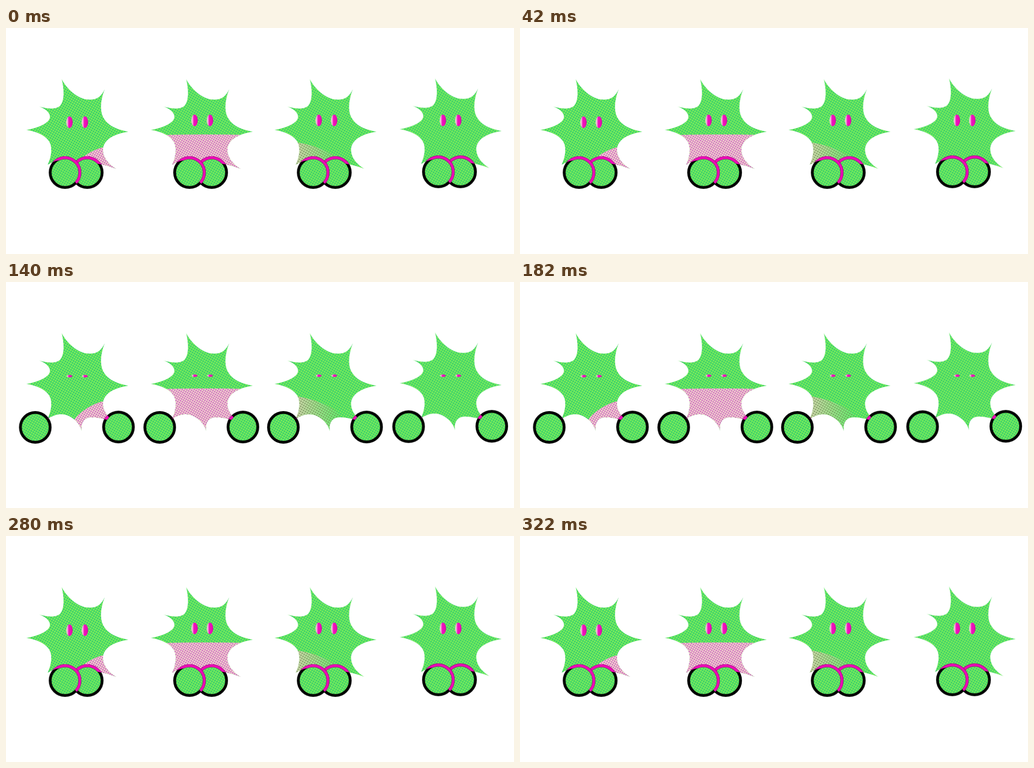
An HTML page that plays this animation: 1121x499 px, repeating every 0.35 s.

```html
<!DOCTYPE html>
<html lang="en">
<head>
<meta charset="utf-8">
<title>Spiky walkers</title>
<style>
  html, body { margin: 0; width: 100%; height: 100%; overflow: hidden; background: #fff; }
  svg { display: block; width: 1121px; height: 499px; }
  .left, .right, .eye { animation: 350ms step-end infinite; }
  .left { animation-name: left; }
  .right { animation-name: right; }
  .eye { animation-name: blink; }
  .ring { fill: none; stroke-width: 6.2; }
  .black { stroke: #000; }
  .pink { stroke: #ec0cb6; }
  @keyframes left {
    0%, 80% { transform: translate(130.3px, 319.2px); }
    20%, 60% { transform: translate(96.8px, 320.7px); }
    40% { transform: translate(64.6px, 321px); }
  }
  @keyframes right {
    0%, 80% { transform: translate(179.3px, 319.2px); }
    20%, 60% { transform: translate(214.8px, 320.7px); }
    40% { transform: translate(248.2px, 320.2px); }
  }
  @keyframes blink {
    0%, 60% { transform: none; }
    40% { transform: translateY(var(--dip)) scale(.9, .22); }
  }
</style>
</head>
<body>
<svg viewBox="0 0 1121 499">
  <defs>
    <path id="body" d="M123 113C133 133 158 158 183 158C200 159 210 152 218 135
      C208 160 207 184 215 198C225 216 244 224 270 229
      C238 234 217 246 214 266C213 284 224 299 243 311
      C222 303 195 296 180 300C169 304 165 315 167 329
      C163 310 142 292 122 292C110 292 100 297 92 302
      C97 290 102 276 99 260C95 240 70 229 45 225
      C70 221 97 210 97 196C97 186 85 177 72 173
      C92 179 110 180 119 172C130 160 128 134 123 113Z"/>
    <clipPath id="inBody"><use href="#body"/></clipPath>
    <clipPath id="inGreen">
      <use href="#body"/>
      <circle cx="179.3" cy="319.2" r="34"/>
    </clipPath>
    <pattern id="green" width="5" height="5" patternUnits="userSpaceOnUse" patternTransform="rotate(30)">
      <rect width="5" height="5" fill="#56ee62"/>
      <circle cx="1.3" cy="1.3" r="1.15" fill="#2c9a78"/>
      <circle cx="3.8" cy="3.8" r="1.1" fill="#b2dc50"/>
    </pattern>
    <pattern id="rose" width="4.6" height="4.6" patternUnits="userSpaceOnUse" patternTransform="rotate(30)">
      <rect width="4.6" height="4.6" fill="#f5dee2"/>
      <circle cx="1.5" cy="1.5" r="1.4" fill="#c23cae"/>
      <circle cx="3.7" cy="3.7" r=".8" fill="#d8b070"/>
    </pattern>
    <pattern id="specks" width="5" height="5" patternUnits="userSpaceOnUse" patternTransform="rotate(30)">
      <circle cx="1.3" cy="1.3" r="1.25" fill="#66804e"/>
    </pattern>
    <linearGradient id="fade">
      <stop offset="0" stop-color="#d6d3b0"/>
      <stop offset=".45" stop-color="#a4df8e"/>
      <stop offset="1" stop-color="#62ee6c"/>
    </linearGradient>
    <linearGradient id="iris">
      <stop offset="0" stop-color="#d4ecc4"/>
      <stop offset=".22" stop-color="#f0a4d8"/>
      <stop offset=".4" stop-color="#f014bc"/>
      <stop offset=".8" stop-color="#ea0cb4"/>
      <stop offset="1" stop-color="#b81c94"/>
    </linearGradient>
  </defs>
  <g id="stage"></g>
</svg>
<script>
  const bellies = {
    corner: 'M149 306C160 289 188 269 216 263L260 340H149Z',
    half: 'M80 236Q168 234 255 236V340H80Z',
    side: 'M85 252C120 254 165 270 190 292V340H85Z'
  };

  const walkers = [
    { x: 0, y: 0, eyeX: 140, eyeY: 208, dip: 0, belly: 'corner', fills: ['rose'] },
    { x: 274.6, y: 0, eyeX: 141.4, eyeY: 204, dip: 3, belly: 'half', fills: ['rose'] },
    { x: 547.5, y: 0, eyeX: 142.5, eyeY: 204, dip: 3, belly: 'side', fills: ['fade', 'specks'] },
    { x: 823.8, y: -1.6, eyeX: 140.2, eyeY: 205.6, dip: 3, fills: [] }
  ];

  const ring = (side, color) =>
    `<g class="${side}"><circle class="ring ${color}" r="32.8"/></g>`;

  const wheel = (side, clip) => `
    <g class="${side}"><circle r="32.8" fill="url(#green)"/></g>
    ${ring(side, 'black')}
    <g clip-path="url(#${clip})">${ring(side, 'pink')}</g>`;

  const eye = (x, y, dip) => `
    <g transform="translate(${x} ${y})">
      <ellipse class="eye" style="--dip:${dip}px" rx="7.2" ry="12.8" fill="url(#iris)"/>
    </g>`;

  const walker = w => `
    <g transform="translate(${w.x} ${w.y})">
      <use href="#body" fill="url(#green)"/>
      <g clip-path="url(#inBody)">
        ${w.fills.map(f => `<path d="${bellies[w.belly]}" fill="url(#${f})"/>`).join('')}
      </g>
      ${eye(w.eyeX, w.eyeY, w.dip)}
      ${eye(w.eyeX + 34, w.eyeY, w.dip)}
      ${wheel('right', 'inBody')}
      ${wheel('left', 'inGreen')}
    </g>`;

  document.getElementById('stage').innerHTML = walkers.map(walker).join('');
</script>
</body>
</html>
```
